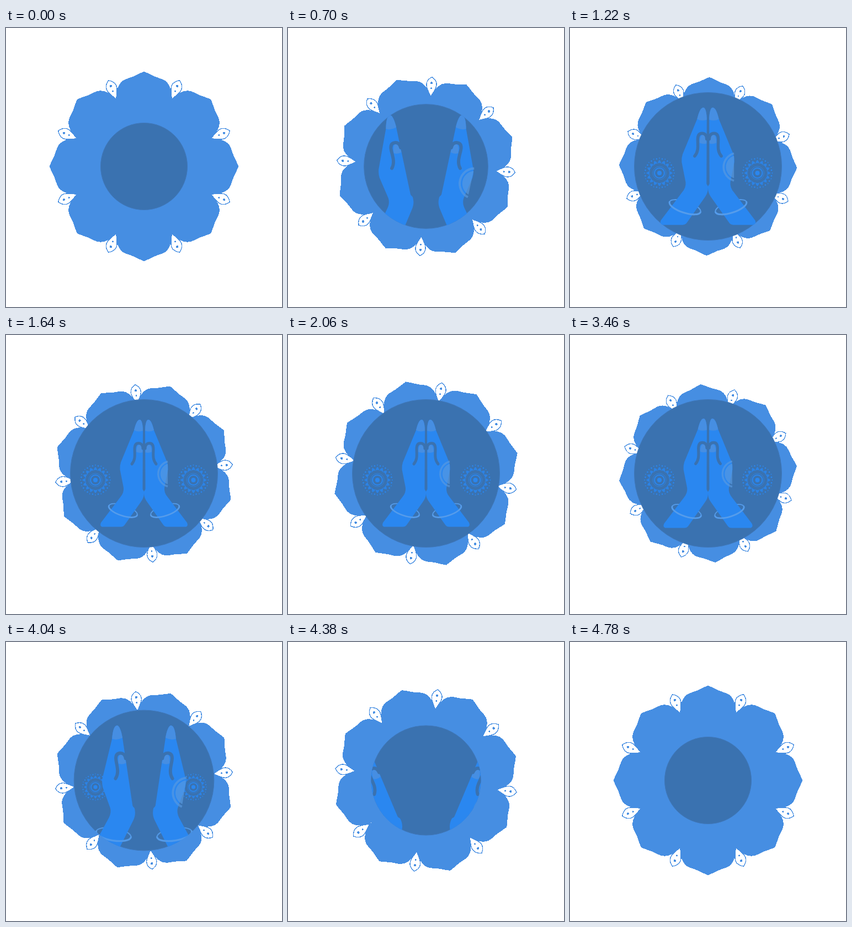
Recreate the animation shown at these times as an HTML page. Size 500 by 504 pixels, loop 4800 ms.

```html
<!DOCTYPE html>
<html lang="en">
<head>
<meta charset="utf-8">
<title>Namaste</title>
<style>
  html, body { margin: 0; width: 100%; height: 100%; overflow: hidden; background: #fff; }
  svg { display: block; width: 500px; height: 504px; }
</style>
</head>
<body>
<svg viewBox="0 0 500 504">
  <defs>
    <path id="petal" fill="#468ee2" d="M0 0L-50.4-121.700C-50-143-44-155-29-159C-19-161.500-10-167.500 0-171.300C10-167.500 19-161.500 29-159C44-155 50-143 50.400-121.700Z"/>
    <g id="drop" fill="#468ee2">
      <path fill="#fff" stroke="#468ee2" stroke-width="1.4" d="M0-131C-4-140-9.500-146-9.500-154C-9.500-161-5-165 0-168C5-165 9.500-161 9.500-154C9.500-146 4-140 0-131Z"/>
      <circle cy="-157" r="2.2"/>
      <circle cy="-147" r="1.5"/>
    </g>
    <g id="hand">
      <ellipse class="bangle" cx="212" cy="317" rx="27" ry="9.5" transform="rotate(18 212 317)" fill="none" stroke="#559ceb" stroke-width="1.8"/>
      <path fill="#2a87f0" d="M232 172C235 160 238 153 242.500 153C246 153 248 163 248 173L247.500 278C248 281 250 281 250 284C250 291 249 295 244 302L215 343Q212.500 346.500 208 346.500H174Q169.500 345 172 339L207 293Q214 285 213 276L206.500 243Q206 236 208 230Z"/>
      <g fill="#468ee2">
        <path d="M232 172C235 160 238 153 242.500 153C246 153 248 163 248 173Q239 176 232 172Z"/>
        <path d="M236 211C236.500 203 238 198 242 198C246 198 247.500 204 247.500 212Q241 214 236 211Z"/>
      </g>
      <path fill="none" stroke="#3a72b0" stroke-width="5" stroke-linecap="round" d="M228 233C235 225 233 215 233 206C233 198 236 195.500 240 195.500C245 195.500 248 199 248 205"/>
      <path class="bangle" fill="none" stroke="#559ceb" stroke-width="2.8" stroke-linecap="round" d="M-27 0A27 9.500 0 0 0 27 0" transform="translate(212 317) rotate(18)"/>
    </g>
    <clipPath id="disc"><circle id="hole" cx="250" cy="250" r="79"/></clipPath>
  </defs>
  <g id="flower" shape-rendering="crispEdges"></g>
  <circle id="plate" cx="250" cy="250" r="79" fill="#3a72b0" stroke="#3f78bb"/>
  <g clip-path="url(#disc)">
    <g id="mandalaL" class="mandala"></g>
    <g id="mandalaR" class="mandala"></g>
    <g id="left"><use href="#hand"/></g>
    <g transform="translate(500 0) scale(-1 1)">
      <g id="right">
        <use href="#hand"/>
        <g opacity=".65">
          <path fill="#5a9ae0" d="M207 232.500A19.500 19.500 0 0 1 207 269.500Z"/>
          <path fill="none" stroke="#5a9ae0" stroke-width="3.4" d="M207 228.500A23.300 23.300 0 0 1 207 273.500"/>
        </g>
      </g>
    </g>
  </g>
</svg>
<script>
const LOOP = 4800, STEP = 20, END = LOOP - STEP;
const $ = id => document.getElementById(id);

function add(parent, tag, attrs) {
  const el = document.createElementNS('http://www.w3.org/2000/svg', tag);
  for (const key in attrs) el.setAttribute(key, attrs[key]);
  parent.appendChild(el);
}

for (const [part, turn] of [['drop', 22.5], ['petal', 0]]) {
  for (let i = 0; i < 8; i++) {
    add($('flower'), 'use', { href: '#' + part, transform: `rotate(${i * 45 + turn})` });
  }
}
// Covers the seams between petals.
add($('flower'), 'circle', { r: 121, fill: '#468ee2' });

function buildMandala(group) {
  const blue = '#2a87f0';
  add(group, 'circle', { r: 4, fill: blue });
  add(group, 'circle', { r: 9, fill: 'none', stroke: blue, 'stroke-width': 2 });
  add(group, 'circle', { r: 12, fill: 'none', stroke: blue, 'stroke-width': 0.7 });
  for (let i = 0; i < 16; i++) {
    const transform = `rotate(${i * 22.5})`;
    add(group, 'path', {
      d: 'M-3.500-17Q-3-21 0-24Q3-21 3.500-17Q0-19.500-3.500-17',
      fill: blue, 'fill-opacity': 0.85, transform
    });
    add(group, 'circle', { cy: -26, r: 1.3, fill: blue, transform: `rotate(${i * 22.5 + 11.25})` });
    add(group, 'circle', { cy: -27, r: 0.9, fill: blue, transform });
  }
}
document.querySelectorAll('.mandala').forEach(buildMandala);
const bangles = document.querySelectorAll('.bangle');

// Sine ease from 0 to 1 between two times.
function ramp(t, from, to) {
  const x = Math.min(1, Math.max(0, (t - from) / (to - from)));
  return (1 - Math.cos(Math.PI * x)) / 2;
}
// Rises over a..b, falls over c..d.
const hold = (t, a, b, c, d) => ramp(t, a, b) - ramp(t, c, d);

function draw(t) {
  const p = t / END;
  const pulse = 0.9708 + 0.0292 * Math.cos(4 * Math.PI * p);
  $('flower').setAttribute('transform', `translate(250 250) rotate(${180 * p}) scale(${pulse})`);

  const r = 79 + 55 * hold(t, 0, 1220, 3824, END);
  $('plate').setAttribute('r', r - 0.5);
  $('hole').setAttribute('r', r);

  const apart = 1 - hold(t, 0, 1220, 3640, END);
  const size = 1.18 - 0.18 * hold(t, 960, 1500, 3350, 3850);
  const pose = `translate(${250 - 25 * size - 82 * apart} ${250 + 62 * apart})`
    + ` rotate(${-32 * apart}) scale(${size}) translate(-225 -250)`;
  $('left').setAttribute('transform', pose);
  $('right').setAttribute('transform', pose);

  const bloom = hold(t, 717, 1195, 3824, END);
  $('mandalaL').setAttribute('transform', `translate(162 262) scale(${bloom})`);
  $('mandalaR').setAttribute('transform', `translate(339.5 262) scale(${bloom})`);
  bangles.forEach(b => b.setAttribute('opacity', bloom));
}

const start = performance.now();
function tick() {
  const t = (performance.now() - start) % LOOP;
  draw(Math.floor(t / STEP) * STEP);
  requestAnimationFrame(tick);
}
draw(0);
requestAnimationFrame(tick);
</script>
</body>
</html>
```
